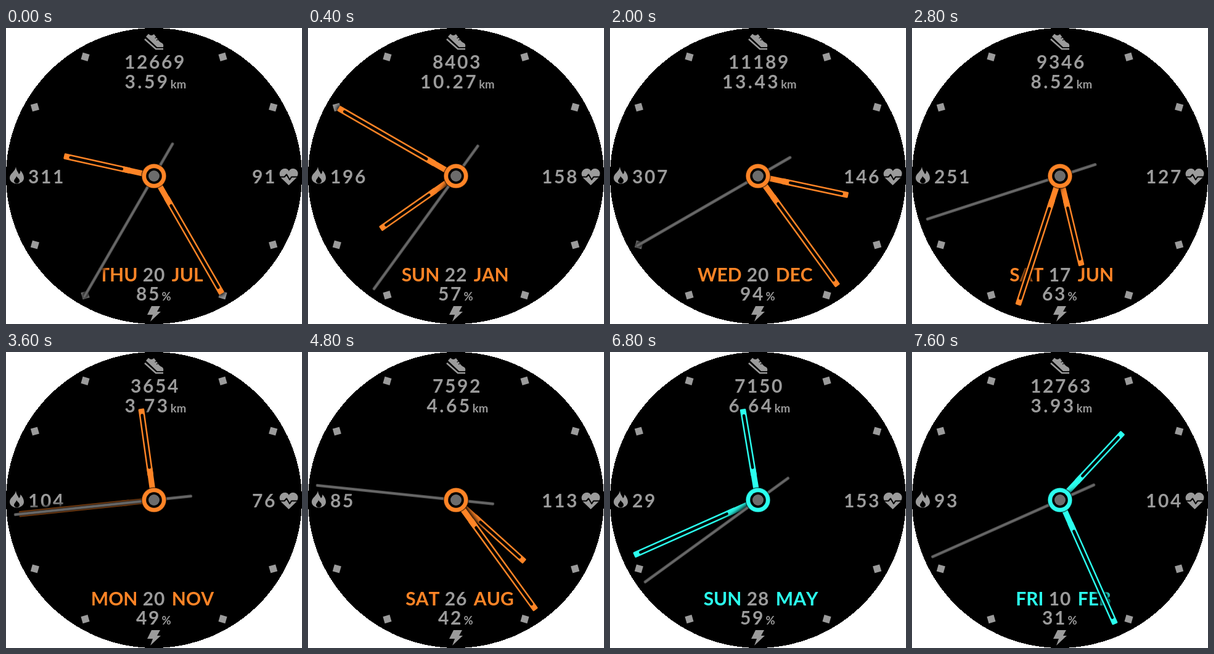
An HTML page for the animation above (8000 ms loop, 480 px wide and 480 px high).

```html
<!DOCTYPE html>
<html lang="en">
<head>
<meta charset="utf-8">
<title>Watch face</title>
<style>
  html, body { margin: 0; width: 100%; height: 100%; overflow: hidden; background: #fff; }
  svg { display: block; width: 100vw; height: 100vh; --accent: #ff8426; }
  text { font: 700 30px Lato, "Open Sans", sans-serif; fill: #9b9b9b; white-space: pre; }
  .num { letter-spacing: 2.6px; }
  .wide { letter-spacing: 3.5px; }
  .unit { font-size: 18.5px; letter-spacing: 0; }
  .accent { fill: var(--accent); font-kerning: none; }
  .icon { fill: #9b9b9b; }
  .cut { fill: none; stroke: #000; stroke-width: 2; stroke-linejoin: round; }
  .hand { filter: drop-shadow(0 0 3px #000) drop-shadow(0 0 4.500px #000); }
  #second path { stroke-linecap: round; }
</style>
</head>
<body>
<svg viewBox="0 0 480 480">
  <circle cx="240" cy="240" r="240" shape-rendering="crispEdges"/>
  <g id="marks" class="icon"></g>

  <g class="icon">
    <path d="M227 14 231 9.500Q235 14 240 10L246 18Q248 22 253 24.500Q256 26 255 31H245Z"/>
    <path d="M225 18 243 34H255" fill="none" stroke="#9b9b9b" stroke-width="2.600"/>
    <path d="M241.500 16.500 244 15M244 20 246.500 18.500" stroke="#000" stroke-width="1.200"/>
    <path d="M236 451H250L245 460H251L234 476 238 465H229Z"/>
    <path d="M16 225C17 232 20 234 21 237 23 236 23 234 23.500 231 27 235 29 239 29 243A11.500 9.500 0 0 1 6 243C6 236 15 233 16 225Z"/>
    <path d="M17 240C18 243 22 244 22 248A4.500 4 0 0 1 13 248C13 245 17 243 17 240Z" fill="#000"/>
    <path d="M458.500 255 446 243C440 234 447 228 452 228 456 228 458 230 458.500 232 460 230 462 228 465 228 471 228 477 234 471 243Z"/>
    <path class="cut" d="M442 241.500H451.500L455 237.500 460 246 463 241.500H475"/>
  </g>

  <text id="steps" class="num" x="242" y="66" text-anchor="middle"></text>
  <text class="wide" x="242.300" y="98" text-anchor="middle"><tspan id="dist"></tspan><tspan class="unit" dx="1">km</tspan></text>
  <text id="cal" class="num" x="36" y="252"></text>
  <text id="pulse" class="num" x="439" y="252" text-anchor="end"></text>
  <text id="day" class="accent" x="213.500" y="411" text-anchor="end"></text>
  <text id="date" x="240" y="411" text-anchor="middle" letter-spacing=".8"></text>
  <text id="month" class="accent" x="268.800" y="411"></text>
  <text class="num" x="211" y="442"><tspan id="power"></tspan><tspan class="unit" dx="1.500">%</tspan></text>

  <g class="hand"><g id="hour">
    <path class="accent" d="M-4.600 0V-52H4.600V0Z"/>
    <rect class="accent" x="-4.800" y="-149.500" width="9.600" height="110" rx="1.500"/>
    <rect x="-2.300" y="-141" width="4.600" height="90" rx="2.300"/>
  </g></g>
  <g class="hand"><g id="minute">
    <path class="accent" d="M-4.600 0V-54H4.600V0Z"/>
    <rect class="accent" x="-4.800" y="-220" width="9.600" height="180" rx="1.500"/>
    <rect x="-2.300" y="-211" width="4.600" height="158" rx="2.300"/>
  </g></g>
  <g class="hand"><g id="second">
    <path d="M0 60V-226" stroke="#4c4c4c" stroke-width="5"/>
    <path d="M0 60V-226" stroke="#6a6a6a" stroke-width="2.600"/>
  </g></g>

  <circle class="accent" cx="240" cy="240" r="20" stroke="#000" stroke-width="1.400" stroke-opacity=".6"/>
  <circle cx="240" cy="240" r="12.800"/>
  <circle cx="240" cy="240" r="9" fill="#6c6c6c"/>
</svg>
<script>
const STEP = 400, STEPS = 20, CYCLE = 12, FIRST_SECOND = 35;
const FIELDS = ["steps", "dist", "cal", "pulse", "day", "date", "month", "power"];

// hour:minute, then one value per field
const READINGS = [
  "9:25 12669 3.59 311 91 THU 20 JUL 85",
  "7:50 8403 10.27 196 158 SUN 22 JAN 57",
  "2:12 5921 7.16 142 88 TUE 14 MAR 72",
  "6:54 4288 12.43 163 71 WED 22 FEB 26",
  "11:41 7150 6.64 29 153 SUN 28 MAY 59",
  "3:24 11189 13.43 307 146 WED 20 DEC 94",
  "1:26 12763 3.93 93 104 FRI 10 FEB 31",
  "5:33 9346 8.52 251 127 SAT 17 JUN 63",
  "8:16 6817 5.38 178 97 TUE 24 OCT 38",
  "11:44 3654 3.73 104 76 MON 20 NOV 49",
  "10:08 10275 9.81 236 136 THU 13 APR 77",
  "4:24 7592 4.65 85 113 SAT 26 AUG 42"
].map(row => row.split(" "));

const $ = id => document.getElementById(id);
const turn = (id, deg) => $(id).setAttribute("transform", `translate(240 240) rotate(${deg})`);

[30, 60, 120, 150, 210, 240, 300, 330].forEach((deg, i) => {
  const a = deg * Math.PI / 180;
  const x = 240 + 223 * Math.sin(a), y = 240 - 223 * Math.cos(a);
  const tilt = i % 2 ? 16 : -16;
  $("marks").insertAdjacentHTML("beforeend",
    `<rect x="-5.7" y="-5.7" width="11.4" height="11.4" transform="translate(${x} ${y}) rotate(${tilt})"/>`);
});

let shown = -1;

function show(step) {
  // the last reading of the first cycle is held for one extra step
  const k = step <= CYCLE ? Math.min(step, CYCLE - 1) : step - CYCLE - 1;
  const [time, ...values] = READINGS[k];
  const [h, m] = time.split(":").map(Number);
  FIELDS.forEach((id, i) => $(id).textContent = values[i]);
  turn("hour", h * 30 + m / 2);
  turn("minute", m * 6);
  turn("second", (FIRST_SECOND + k) * 6);
  document.querySelector("svg").style.setProperty("--accent", step <= CYCLE ? "#ff8426" : "#2bffee");
}

function frame(now) {
  const step = Math.floor(now / STEP) % STEPS;
  if (step !== shown) show(shown = step);
  requestAnimationFrame(frame);
}

show(0);
requestAnimationFrame(frame);
</script>
</body>
</html>
```
